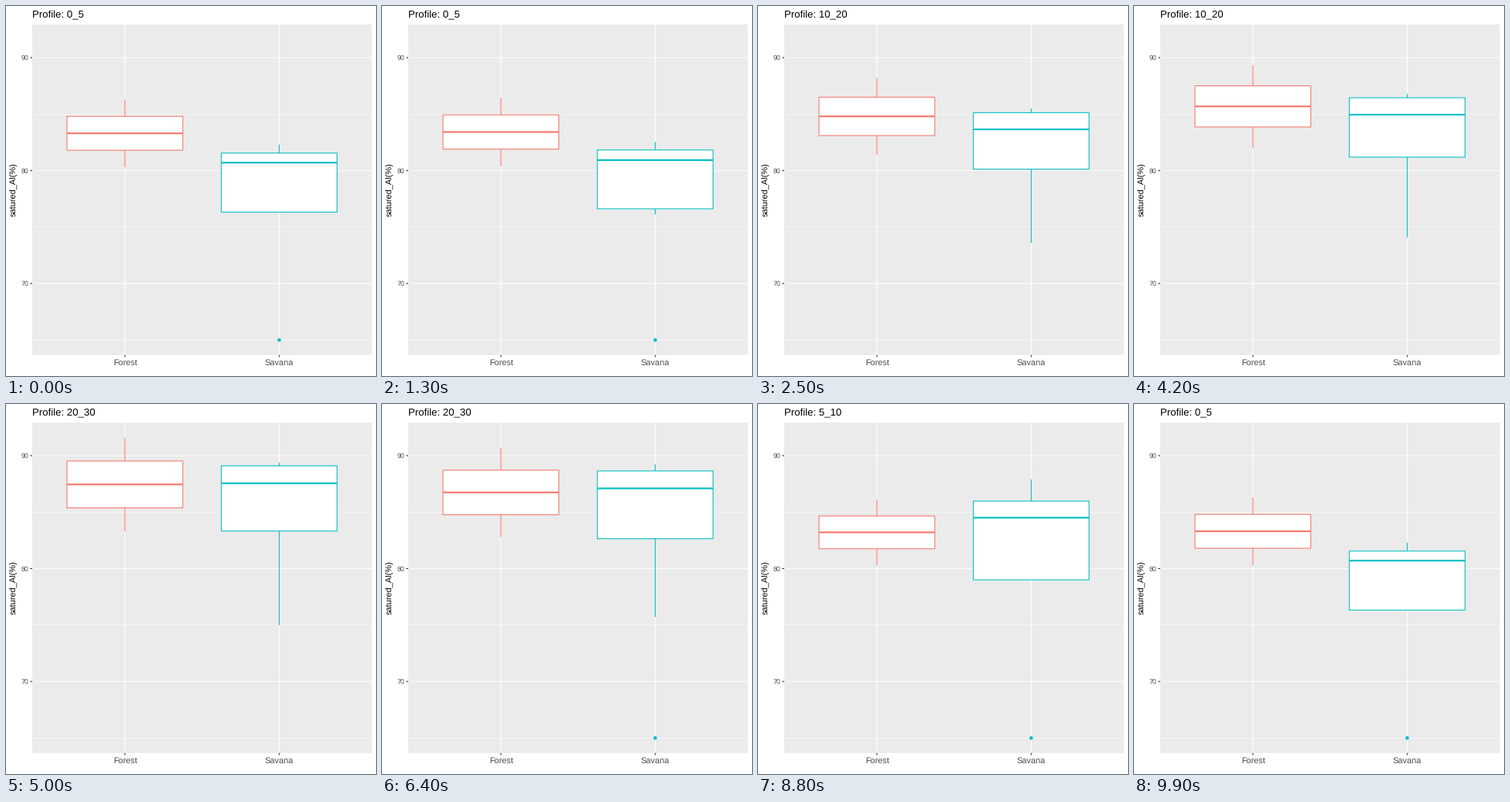
These frames come from a looping animation (480 by 480 pixels, 10000 ms). A matplotlib script:

```python
import numpy as np
import matplotlib.pyplot as plt
from matplotlib.animation import FuncAnimation
from matplotlib.patches import Circle, Rectangle

plt.rcParams["font.family"] = "Liberation Sans"
plt.rcParams["text.hinting"] = "none"
plt.rcParams["toolbar"] = "None"

SIZE, DPI = 480, 96
PT = 72 / DPI                      # points per pixel
LEFT, RIGHT, TOP, BOTTOM = 34.05, 474.5, 24.05, 452.75
CENTERS = (154.2, 354.4)
BOX_W = 150.2
LINE = 1.07
COLORS = ("#F8766D", "#00BFC4")

# Samples behind each box: forest, savana
STATES = [
    ("0_5", (80.3, 86.3), (65, 80.1, 81.3, 82.3)),
    ("10_20", (81.4, 88.2), (73.6, 82.3, 85.0, 85.5)),
    ("20_30", (83.3, 91.6), (75.0, 86.1, 89.0, 89.4)),
    ("5_10", (80.3, 86.1), (65, 84.0, 85.7, 88.4)),
]
# Start and end of the move out of each state
MOVES = [(12, 25), (38, 50), (62, 74), (87, 99)]
FRAMES, INTERVAL = 100, 100


def ypix(value):
    return 67 + (90 - value) * 14.65


def box_stats(sample):
    """Lower whisker, quartiles, upper whisker and whether there is an outlier."""
    q1, mid, q3 = np.percentile(sample, (25, 50, 75))
    fence = q1 - 1.5 * (q3 - q1)
    low = min(min(v for v in sample if v >= fence), q1)
    return np.array([low, q1, mid, q3, max(sample)]), min(sample) < fence


NAMES = [s[0] for s in STATES]
STATS = [[box_stats(sample) for sample in s[1:]] for s in STATES]

fig = plt.figure(figsize=(SIZE / DPI, SIZE / DPI), dpi=DPI, facecolor="white")
ax = fig.add_axes([0, 0, 1, 1])
ax.set_xlim(0, SIZE)
ax.set_ylim(SIZE, 0)
ax.axis("off")


def line(xs, ys, color, width=LINE, z=1):
    artist, = ax.plot(xs, ys, color=color, lw=width * PT, zorder=z,
                      solid_capstyle="butt", snap=False)
    return artist


def label(x, y, text, px, color="black", **kw):
    return ax.text(x, y, text, fontsize=px * PT, color=color,
                   va="baseline", **kw)


def draw_panel():
    ax.add_patch(Rectangle((LEFT, TOP), RIGHT - LEFT, BOTTOM - TOP,
                           fc="#EBEBEB", ec="none", zorder=0, snap=False))
    for v in (65, 75, 85):
        line((LEFT, RIGHT), (ypix(v),) * 2, "white", LINE / 2)
    for v in (70, 80, 90):
        y = ypix(v)
        line((LEFT, RIGHT), (y, y), "white")
        line((LEFT - 2.75, LEFT), (y, y), "#333333")
        label(29.1, y + 3.2, str(v), 8.8, "#4D4D4D", ha="right")
    for x, name in zip(CENTERS, ("Forest", "Savana")):
        line((x, x), (TOP, BOTTOM), "white")
        line((x, x), (BOTTOM, BOTTOM + 2.75), "#333333")
        label(x, 466, name, 11, "#4D4D4D", ha="center")
    label(13.2, (TOP + BOTTOM) / 2, "satured_Al(%)", 11, ha="center",
          rotation=90, rotation_mode="anchor")


class BoxPlot:
    def __init__(self, x, color):
        self.whiskers = [line((x, x), (0, 0), color, z=3) for _ in range(2)]
        self.box = Rectangle((x - BOX_W / 2, 0), BOX_W, 1, fc="white",
                             ec=color, lw=LINE * PT, joinstyle="miter",
                             zorder=4, snap=False)
        ax.add_patch(self.box)
        self.median = line((x - BOX_W / 2, x + BOX_W / 2), (0, 0), color,
                           2 * LINE, z=5)
        self.dot = Circle((x, ypix(65)), 2.3, fc=color, ec="none", zorder=3)
        ax.add_patch(self.dot)

    def update(self, stats, outlier):
        low, q1, mid, q3, high = ypix(stats)
        self.whiskers[0].set_ydata((low, q1))
        self.whiskers[1].set_ydata((q3, high))
        self.box.set_y(q3)
        self.box.set_height(q1 - q3)
        self.median.set_ydata((mid, mid))
        self.dot.set_visible(bool(outlier))


draw_panel()
title = label(LEFT, 15, "", 13.2, ha="left")
plots = [BoxPlot(x, c) for x, c in zip(CENTERS, COLORS)]


def locate(frame):
    """State being left, state being approached, and progress between them."""
    for i, (start, end) in enumerate(MOVES):
        if frame <= end:
            t = max(0, (frame - start) / (end - start))
            return i, (i + 1) % len(STATES), t


def update(frame):
    a, b, t = locate(frame)
    title.set_text("Profile: " + NAMES[b if t >= 0.5 else a])
    for plot, (s0, out0), (s1, out1) in zip(plots, STATS[a], STATS[b]):
        plot.update(s0 + (s1 - s0) * t, (out0 and t < 1) or (out1 and t > 0))
    return []


anim = FuncAnimation(fig, update, frames=FRAMES, interval=INTERVAL,
                     init_func=lambda: update(0), repeat=True,
                     repeat_delay=0, blit=False)
plt.show()
```
